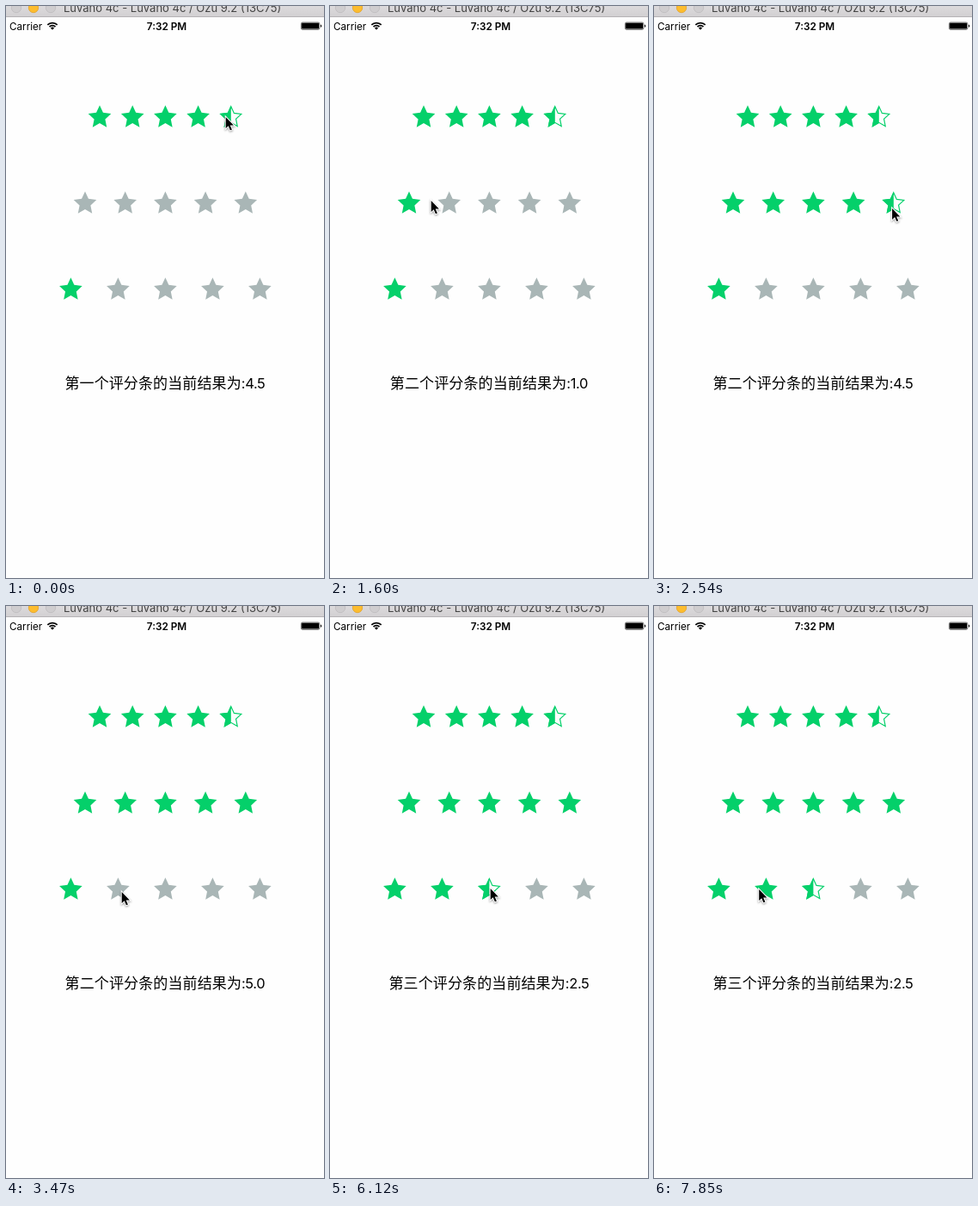
Animation, 370 px wide and 664 px high, one loop 8 s. Source, as an HTML page:

```html
<!DOCTYPE html>
<html lang="zh">
<head>
<meta charset="utf-8">
<title>Star rating bars</title>
<style>
html, body { margin: 0; width: 100%; height: 100%; overflow: hidden; background: #fefefe; }
svg { display: block; width: 370px; height: 664px; }
text { font-family: Inter, "Open Sans", sans-serif; }
.label { font: 17px "Noto Sans CJK SC", "Noto Sans CJK", sans-serif; letter-spacing: .12px; }
.score { font: 16.5px Inter, sans-serif; letter-spacing: -.4px; }
</style>
</head>
<body>
<svg id="stage" viewBox="0 0 370 664"></svg>
<script>
const GREEN = '#04d06a', GRAY = '#a9b6b6', LOOP = 8000, STEP = 57;
const STAR = 14, HALF_WIDTH = 13.3;
const ROWS = [38.2, 46.7, 55].map((gap, r) => ({ gap, x: 185.4 - 2 * gap, y: 129.3 + 100 * r }));
const ORDINALS = ['一', '二', '三'];

// Cursor moves from where it rests: start, end, x, y, ease-out power
const REST = { x: 255, y: 128 };
const MOVES = [
  [60, 360, 256, 128, 1],
  [540, 1130, 83, 220, 2],
  [1550, 1720, 151, 230, 1],
  [2020, 2650, 280, 234, 2],
  [3070, 3470, 134, 331, 1],
  [3530, 3710, 132, 328, 1],
  [4480, 4600, 169.5, 328, 1],
  [4780, 4950, 177, 328, 1],
  [5660, 5770, 200, 330, 1],
  [5950, 6120, 186, 327, 1],
  [6720, 6960, 179, 324, 1],
  [7490, 7850, 121.5, 328, 1]
];
const DRAG = { start: 1550, end: 2650 };   // second bar
const TAPS = [4010, 5360, 6420, 7320];     // third bar

function starPoints(R) {
  return Array.from({ length: 10 }, (_, i) => {
    const r = i % 2 ? R * .48 : R, a = i * Math.PI / 5;
    return [r * Math.sin(a), -r * Math.cos(a)];
  });
}
const poly = pts => pts.map(p => p.map(v => v.toFixed(2)).join()).join(' ');
const full = starPoints(STAR), inner = starPoints(STAR - 1.4);
const leftHalf = [...full.slice(5), full[0]];

const stars = ROWS.map((row, r) => ORDINALS.concat('', '').map((_, i) =>
  `<use id="s${r}${i}" x="${row.x + i * row.gap}" y="${row.y}"/>`).join('')).join('');

const arc = r => {
  const d = r * Math.SQRT1_2;
  return `<path d="M${54 - d},${27.6 - d}A${r},${r} 0 0 1 ${54 + d},${27.6 - d}"/>`;
};
const light = (x, fill, edge) =>
  `<circle cx="${x}" cy="2" r="5.7" fill="${fill}" stroke="${edge}" stroke-width=".8"/>`;

const stage = document.getElementById('stage');
stage.innerHTML = `
<defs>
  <linearGradient id="bar" x2="0" y2="1">
    <stop stop-color="#dcdadc"/><stop offset="1" stop-color="#d2d0d2"/>
  </linearGradient>
  <polygon id="full" points="${poly(full)}" fill="${GREEN}"/>
  <polygon id="empty" points="${poly(full)}" fill="${GRAY}"/>
  <g id="half">
    <polygon points="${poly(inner)}" fill="#fefefe" stroke="${GREEN}" stroke-width="1.2"/>
    <polygon points="${poly(leftHalf)}" fill="${GREEN}"/>
  </g>
</defs>
<rect width="370" height="664" fill="#fefefe"/>
<rect width="370" height="12" fill="url(#bar)"/>
<rect y="12" width="370" height="1" fill="#b5b3b5"/>
${light(12, '#cfcdcf', '#bebcbe')}${light(32, '#fdbd2f', '#e2a22a')}${light(52, '#cfcdcf', '#bebcbe')}
<text x="67" y="7" font-size="13" fill="#444">Luvano 4c - Luvano 4c / Ozu 9.2 (13C75)</text>
<text x="4" y="27.5" font-size="11.7">Carrier</text>
<g fill="none" stroke="#000" stroke-width="1.8">${arc(4.9)}${arc(8)}</g>
<path d="M54,27.8L51.9,25.5A3,3 0 0 1 56.1,25.5Z"/>
<text x="187" y="27.5" font-size="11.8" font-weight="600" text-anchor="middle">7:32 PM</text>
<rect x="343.4" y="19.1" width="21.4" height="8.2" rx="1.6" fill="none" stroke="#000" stroke-width=".6"/>
<rect x="344.1" y="19.8" width="20" height="6.8" rx=".8"/>
<path d="M366,21.6a1.7,1.7 0 0 1 0,3.2z"/>
${stars}
<text class="label" x="184.9" y="444" text-anchor="middle">第<tspan id="ordinal"></tspan>个评分条的当前结果为<tspan id="score" class="score"></tspan></text>
<g id="cursor" style="filter:drop-shadow(0 1px 1px rgba(0,0,0,.4))">
  <path d="M.7,1v13l3-2.8 2.2 5 2-.8-2.2-4.9h4.2z" stroke="#fff" stroke-width="2" paint-order="stroke"/>
</g>`;

const el = id => document.getElementById(id);

// The cursor advances in steps of about STEP ms
function cursorAt(t) {
  let { x, y } = REST;
  for (const [start, end, toX, toY, power] of MOVES) {
    if (t < start) break;
    const last = Math.round((end - start) / STEP);
    const step = Math.floor((t - start + 8) * last / (end - start));
    const k = 1 - (1 - Math.min(1, (step + 1) / (last + 1))) ** power;
    x += (toX - x) * k;
    y += (toY - y) * k;
  }
  return { x, y };
}

// The left half of a star counts as a half, the rest up to the next star as a whole
function ratingAt(row, t) {
  const d = cursorAt(t).x - row.x + HALF_WIDTH;
  const i = Math.floor(d / row.gap);
  return Math.min(5, i + (d - i * row.gap <= HALF_WIDTH ? .5 : 1));
}

function ratings(t) {
  const tap = TAPS.filter(time => time <= t).pop();
  return [
    ratingAt(ROWS[0], 0),
    t < DRAG.start ? 0 : ratingAt(ROWS[1], Math.min(t, DRAG.end)),
    tap ? ratingAt(ROWS[2], tap) : 1
  ];
}

function render(t) {
  const { x, y } = cursorAt(t);
  el('cursor').setAttribute('transform', `translate(${x.toFixed(1)} ${y.toFixed(1)})`);

  const values = ratings(t);
  values.forEach((v, r) => {
    for (let i = 0; i < 5; i++) {
      const kind = v >= i + 1 ? '#full' : v > i ? '#half' : '#empty';
      const star = el(`s${r}${i}`);
      if (star.getAttribute('href') !== kind) star.setAttribute('href', kind);
    }
  });

  const active = t < DRAG.start ? 0 : t < TAPS[0] ? 1 : 2;
  el('ordinal').textContent = ORDINALS[active];
  el('score').textContent = ':' + values[active].toFixed(1);
}

const begin = performance.now();
function tick() {
  render((performance.now() - begin) % LOOP);
  requestAnimationFrame(tick);
}
render(0);
requestAnimationFrame(tick);
</script>
</body>
</html>
```
